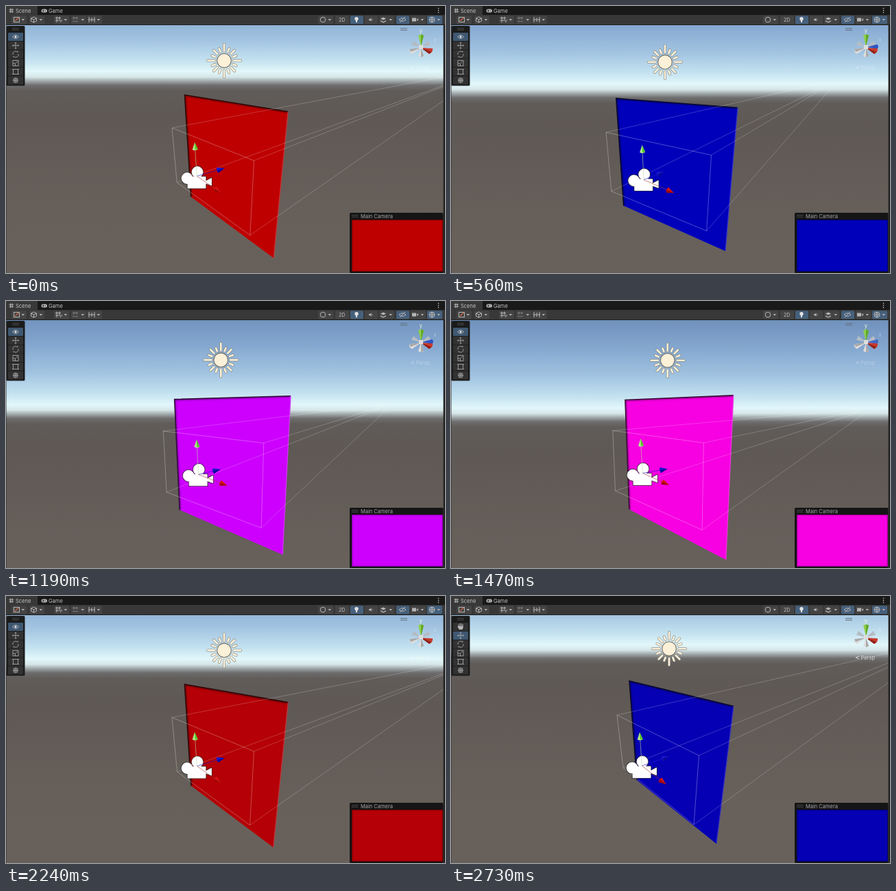
An HTML page for the animation above (2800 ms loop, 640 by 390 pixels).

```html
<!DOCTYPE html>
<html lang="en">
<head>
<meta charset="utf-8">
<title>Scene view</title>
<style>
html, body { margin: 0; width: 100%; height: 100%; overflow: hidden; background: #191919; }
svg { display: block; width: 640px; height: 390px; }
text { font-family: Inter, Roboto, sans-serif; font-size: 7.5px; fill: #c4c4c4; }
.icon { fill: none; stroke: #b4b4b4; stroke-width: 1; }
.solid { fill: #b4b4b4; }
.wire { fill: none; stroke: #fff; stroke-width: .7; }
</style>
</head>
<body>
<svg viewBox="0 0 640 390">
  <defs>
    <linearGradient id="sky" gradientUnits="userSpaceOnUse" x1="0" y1="-150" x2="0" y2="250">
      <stop offset="0" stop-color="#6c8db9"/>
      <stop offset=".125" stop-color="#85a8d0"/>
      <stop offset=".225" stop-color="#a2c4e1"/>
      <stop offset=".3" stop-color="#c4e2f0"/>
      <stop offset=".34" stop-color="#e2f7fa"/>
      <stop offset=".36" stop-color="#d6e6e8"/>
      <stop offset=".375" stop-color="#a0a8aa"/>
      <stop offset=".39" stop-color="#6f6e6e"/>
      <stop offset=".41" stop-color="#605c59"/>
      <stop offset=".5" stop-color="#5f5955"/>
      <stop offset=".925" stop-color="#68615b"/>
    </linearGradient>
    <filter id="soft"><feGaussianBlur stdDeviation="1.2"/></filter>
    <clipPath id="inQuad"><polygon id="clipShape"/></clipPath>
    <path id="body" stroke-linejoin="round" d="M-22,0a8,8 0 1 1 16,0a8,8 0 1 1 -16,0M-7,-9a8,8 0 1 1 16,0a8,8 0 1 1 -16,0M-13,-2H13V14.500H-13ZM12,5L21.500,0V10.500L12,7Z"/>
  </defs>

  <rect y="27" width="640" height="363" fill="url(#sky)"/>
  <g id="sun"></g>
  <polygon id="quad"/>
  <g clip-path="url(#inQuad)">
    <path id="shade" fill="none" stroke="#000" stroke-opacity=".35" stroke-width="4" filter="url(#soft)"/>
  </g>
  <path id="darkEdge" fill="none" stroke-width="1.6"/>
  <path id="lightEdge" fill="none" stroke-width="1.3"/>
  <path id="nearRect" class="wire" stroke-opacity=".42"/>
  <path id="rays" class="wire" stroke-opacity=".3"/>
  <g id="camera">
    <use href="#body" fill="#222" stroke="#222" stroke-width="2.6" opacity=".75"/>
    <use href="#body" fill="#fff" stroke="#fff" stroke-width=".8"/>
  </g>
  <g id="arrows"></g>

  <g>
    <path d="M605,60L594,51L591,57ZM605,60L616,51L619,57Z" fill="#b4bcc4"/>
    <path id="blueAxis" d="M607,60L621,56Q625,59 621,63Z" fill="#2f55c4"/>
    <path d="M605,61L588,63Q587,68 592,70ZM605,61L601,73Q605,76 609,73Z" fill="#dedede"/>
    <path d="M605,61L588,63L590,67ZM605,61L605,75L609,73Z" fill="#a8a8a8"/>
    <path d="M605,61L622,62Q623,67 617,70Z" fill="#c83a2c"/>
    <path d="M605,61L617,70L620,67Z" fill="#8f2219"/>
    <path d="M605,59L601,43Q605,40 609,43Z" fill="#8ed04c"/>
    <path d="M605,59L605,41.5Q607,41.5 609,43Z" fill="#62a82c"/>
    <rect x="602" y="57" width="6" height="6" fill="#ddd"/>
    <text x="602.8" y="39" style="fill:#eaf5dc">y</text>
    <text x="623.5" y="52" style="fill:#fff" opacity=".35">x</text>
    <g id="persp">
      <path d="M595,88L590,90L595,92" fill="none" stroke="#fff"/>
      <text x="597.5" y="93" style="fill:#fff">Persp</text>
    </g>
  </g>
  <path d="M575,32.8h10M575,35.2h10" stroke="#66727c" stroke-width="1.1"/>

  <rect width="640" height="13.5" fill="#191919"/>
  <rect width="46" height="13.5" fill="#383838"/>
  <path class="icon" d="M6.5,3.5V10M9,3.5V10M4.5,5.3H11M4.5,8.2H11"/>
  <text x="14" y="9.7">Scene</text>
  <rect x="51.5" y="4.5" width="8.5" height="5" rx="2.5" class="solid"/>
  <path d="M53,7h2.6M54.3,5.7v2.6M57.5,6.5v1" stroke="#191919" stroke-width=".9"/>
  <text x="62" y="9.7">Game</text>
  <path d="M630.5,2.8v1.4M630.5,5.8v1.4M630.5,8.8v1.4" stroke="#c6c6c6" stroke-width="1.3"/>
  <rect y="13" width="640" height="14.5" fill="#383838"/>
  <rect y="27" width="640" height="1" fill="#202020"/>
  <g id="bar"></g>
  <g>
    <rect x="11.5" y="16.5" width="8" height="7" class="icon"/>
    <path d="M13,22L18.5,17" stroke="#d56848" stroke-width="1.2"/>
    <path class="icon" d="M40.5,16L44.5,18V22L40.5,24L36.5,22V18ZM36.5,18L40.5,20L44.5,18M40.5,20V24"/>
    <path class="icon" d="M72,17.5H80M72,21H80M74,15.5V24M78,15.5V20M79,24L82,20"/>
    <path class="icon" d="M97,17.5H105M97,22.5H105M99,15.5V20M103,15.5V20" stroke-opacity=".45"/>
    <path class="icon" d="M120,20H130M121,16V24M125,17V23M129,16V24"/>
    <circle cx="462" cy="20" r="3.8" class="icon"/>
    <text x="485" y="22.7" style="font-size:7px">2D</text>
    <circle cx="511" cy="18.7" r="2.7" fill="#e2e2e2"/>
    <path d="M511,20V24" stroke="#e2e2e2" stroke-width="2"/>
    <path d="M529,19h1.5l2,-1.5v5l-2,-1.5h-1.5Z" class="solid"/>
    <path class="icon" d="M534,18.5v3" stroke-opacity=".6"/>
    <path d="M546,18.5l4,-2l4,2l-4,2ZM546,21l4,2l4,-2v1.5l-4,2l-4,-2Z" class="solid"/>
    <path class="icon" d="M573,20Q578,15.5 583,20Q578,24.5 573,20M574,24L582,16"/>
    <path d="M592,17.5h6v5h-6ZM598.5,20l2.5,-2v4Z" class="solid"/>
    <circle cx="621" cy="20" r="4" class="icon"/>
    <path class="icon" d="M617,20H625M621,16Q618,20 621,24M621,16Q624,20 621,24"/>
  </g>

  <rect x=".5" y="29" width="27" height="87.5" rx="1.5" fill="#1b1b1b"/>
  <path d="M9,32.7h10M9,35h10" stroke="#4a4a4a"/>
  <g id="tools"></g>
  <g id="eye">
    <path class="icon" d="M9.5,45Q14,40 18.5,45Q14,50 9.5,45Z"/><circle cx="14" cy="45" r="1.5" fill="#e8e8e8"/>
  </g>
  <path id="hand" d="M11,44v-2.5M13,44v-4M15,44v-4M17,44v-3M10,44.5h7.5l-1,4h-4.5Z" stroke="#b4b4b4" class="solid"/>
  <g opacity=".8">
    <path class="icon" d="M14,53V62.5M9.5,57.7H18.5M12.7,54.3L14,53L15.3,54.3M12.7,61.2L14,62.5L15.3,61.2M10.8,56.4L9.5,57.7L10.8,59M17.2,56.4L18.5,57.7L17.2,59"/>
    <path class="icon" d="M10,71A4,4 0 0 1 17,67.5V65.5M18,70A4,4 0 0 1 11,73.5V75"/>
    <path class="icon" d="M10,79.5H18V87.5H10ZM10,84H13.5V87.5M14,83.5L17,80.5"/>
    <path class="icon" d="M10.5,92.5H17.5V99.5H10.5ZM9,92.5H12M16,92.5H19M9,99.5H12M16,99.5H19"/>
    <path class="icon" d="M14,104.5V112.5M10,108.5H18M11,105.5L17,111.5M11,111.5L17,105.5"/>
    <circle cx="14" cy="108.5" r="3.3" class="icon"/>
  </g>

  <rect x="501" y="302" width="136.5" height="88" rx="1.5" fill="#151515"/>
  <path d="M504,305.7h9.5M504,308.2h9.5" stroke="#4a4a4a"/>
  <text x="517" y="309.7" style="fill:#a8a8a8">Main Camera</text>
  <rect id="preview" x="504" y="312" width="133" height="76"/>
  <rect x="504.5" y="312.5" width="132" height="75" fill="none" stroke="#000" stroke-opacity=".35" stroke-width="1.6"/>
  <path d="M638.8,28V390" stroke="#222" stroke-width="2.4"/>
  <path d="M.3,28V390" stroke="#222" stroke-width=".6"/>
</svg>
<script>
const LOOP = 2800, STEP = 70, RELEASE = 2660;
const TIMES = [0, 560, 910, 1470, 1820, 2240, 2730];
const $ = id => document.getElementById(id);
const set = (id, attrs) => { for (const k in attrs) $(id).setAttribute(k, attrs[k]); };

// Monotone cubic through one value per key time.
function track(...v) {
  const n = v.length - 1;
  const slope = i => (v[i + 1] - v[i]) / (TIMES[i + 1] - TIMES[i]);
  const tangent = i => {
    if (i === 0) return slope(0);
    if (i === n) return slope(n - 1);
    const a = slope(i - 1), b = slope(i);
    return a * b > 0 ? 2 * a * b / (a + b) : 0;
  };
  return t => {
    if (t >= TIMES[n]) return v[n];
    let i = 0;
    while (t >= TIMES[i + 1]) i++;
    const h = TIMES[i + 1] - TIMES[i], s = (t - TIMES[i]) / h, r = 1 - s;
    return r * r * (1 + 2 * s) * v[i] + s * s * (3 - 2 * s) * v[i + 1]
      + h * s * r * (r * tangent(i) - s * tangent(i + 1));
  };
}

// The orbit: every position follows from these two.
const yaw = track(0, 1, 1.05, .38, .03, 0, 0);
const pitch = track(.45, .78, 1.27, 1.55, 1, .38, 0);

// A rest position and how far it shifts per unit of yaw and of pitch.
const pin = (rest, byYaw, byPitch) => (u, v) =>
  rest.map((c, k) => c + u * byYaw[k] + v * byPitch[k]);

const sunPos = pin([318, 77], [-6, 0], [0, 6.3]);
const vanish = pin([702, 73], [-120, -4], [-38, 58]);
const camPos = pin([278, 251], [2.7, 3], [0, 1.3]);
const origin = pin([278.3, 248], [2.7, 5], [0, 1]);
const greenTip = pin([275, 199], [3.6, 4], [0, .3]);
const redTip = pin([313.5, 275], [11.5, 1.5], [0, -4.5]);
const blueTip = pin([318.5, 234], [-7.5, 3], [0, 6.5]);
// Corners clockwise from the top left.
const quad = [
  pin([260, 124], [-20, .8], [1, 13]),
  pin([412, 161], [7.5, -1], [-2, -14.7]),
  pin([387, 362], [7.5, -15], [7, 14]),
  pin([271, 269], [-17, 6], [-3, 21.5])
];
const near = [
  pin([242, 174], [-16, 3.6], [0, 9]),
  pin([361.5, 233], [18, -2.7], [0, -16]),
  pin([354, 334], [15.5, -7], [4, 2]),
  pin([251, 251], [-14, 8], [-4, 15])
];

const line = pts => 'M' + pts.map(p => p.map(n => n.toFixed(2)).join()).join('L');

function buildStatic() {
  let rays = '';
  for (let i = 0; i < 16; i++) {
    const a = i * Math.PI / 8, end = i % 4 === 0 ? 24 : i % 2 ? 19 : 21.5;
    rays += line([14, end].map(r => [r * Math.cos(a), r * Math.sin(a)]));
  }
  $('sun').innerHTML = `<g fill="none" stroke-linecap="round">
    <path d="${rays}" stroke="#77746c" stroke-opacity=".8" stroke-width="4"/>
    <path d="${rays}" stroke="#fbf1da" stroke-width="2.7"/></g>
    <circle r="10.3" fill="#fbf0d8" stroke="#77746c" stroke-width="1.1"/>`;

  const button = (x, w, caret, on) =>
    `<rect x="${x}" y="14.2" width="${w}" height="12" rx="1.5" fill="${on ? '#46607c' : '#444'}"/>` +
    (caret ? `<path class="solid" d="M${x + w - 7.5},19h4.6l-2.3,2.6Z"/>` : '');
  $('bar').innerHTML = [8, 34, 70, 95, 118, 455, 544, 590].map(x => button(x, 22, true)).join('')
    + button(480, 20) + button(502, 19, false, true) + button(523, 19)
    + button(569, 19, false, true) + button(614, 22, true, true);

  for (let i = 0; i < 6; i++) {
    $('tools').innerHTML += `<rect x="3" y="${39 + i * 12.7}" width="22" height="12" rx="1"/>`;
  }
}

function arrow(from, tip, color, dark, shaft) {
  const dx = tip[0] - from[0], dy = tip[1] - from[1], d = Math.hypot(dx, dy);
  const ux = dx / d, uy = dy / d;
  const at = (back, side) => [tip[0] - ux * back - uy * side, tip[1] - uy * back + ux * side];
  const base = at(10.5, 0), left = at(10.5, -4), right = at(10.5, 4), end = at(13, 0);
  return `<path d="${line([from, base])}" stroke="${shaft}" stroke-opacity=".6"/>
    <path d="${line([tip, left])}Q${end} ${right}Z" fill="${color}"/>
    <path d="${line([tip, right, base])}Z" fill="${dark}"/>`;
}

// Linear light to an sRGB byte, oscillating over time.
function channel(t, peak, gain) {
  const lin = .5 + .5 * Math.cos((t - peak) / 350);
  const s = lin < .0031 ? 12.92 * lin : 1.055 * lin ** (1 / 2.4) - .055;
  return Math.round(255 * s * gain);
}
const tint = (t, gain, add = 0) =>
  `rgb(${channel(t, 1660, gain) + add},${add},${channel(t, 1110, gain) + add})`;

function draw(t) {
  const u = yaw(t), v = pitch(t), at = f => f(u, v);
  const q = quad.map(at), n = near.map(at), vp = at(vanish);
  const mid = [0, 1].map(k => n.reduce((s, p) => s + p[k], 0) / 4);
  const far = n.map(p => p.map((c, k) => vp[k] + .05 * (c - mid[k])));
  const color = tint(t, 1), corners = q.join(' ');

  set('sky', { gradientTransform: `translate(0 ${85 + 55 * v})` });
  set('sun', { transform: `translate(${at(sunPos)})` });
  set('quad', { points: corners, fill: color });
  set('clipShape', { points: corners });
  set('shade', { d: line([q[3], q[0], q[1]]) });
  set('darkEdge', { d: line([q[3], q[0], q[1]]), stroke: tint(t, .2, 10) });
  set('lightEdge', { d: line([q[1], q[2]]), stroke: tint(t, .75, 55) });
  set('nearRect', { d: line(n) + 'Z' });
  set('rays', { d: n.map((p, i) => line([p, far[i]])).join('') });
  set('preview', { fill: color });
  set('camera', { transform: `translate(${at(camPos)})` });
  set('blueAxis', { opacity: Math.min(1, 2 * u) });

  const from = at(origin);
  $('arrows').innerHTML =
    arrow(from, at(blueTip), '#1717cf', '#080890', '#2020d0') +
    arrow(from, at(redTip), '#d81414', '#980808', '#a83a3a') +
    arrow(from, at(greenTip), '#b4e890', '#4fc81e', '#b8dca0');

  const released = t >= RELEASE;
  set('eye', { opacity: released ? 0 : 1 });
  set('hand', { opacity: released ? 1 : 0 });
  set('persp', { opacity: released ? .7 : .3 });
  [...$('tools').children].forEach((r, i) =>
    r.setAttribute('fill', i === (released ? 1 : 0) ? '#3f5872' : '#323232'));
}

buildStatic();
const start = performance.now();
function tick() {
  const t = (performance.now() - start) % LOOP;
  draw(Math.floor(t / STEP) * STEP);
  requestAnimationFrame(tick);
}
tick();
</script>
</body>
</html>
```
